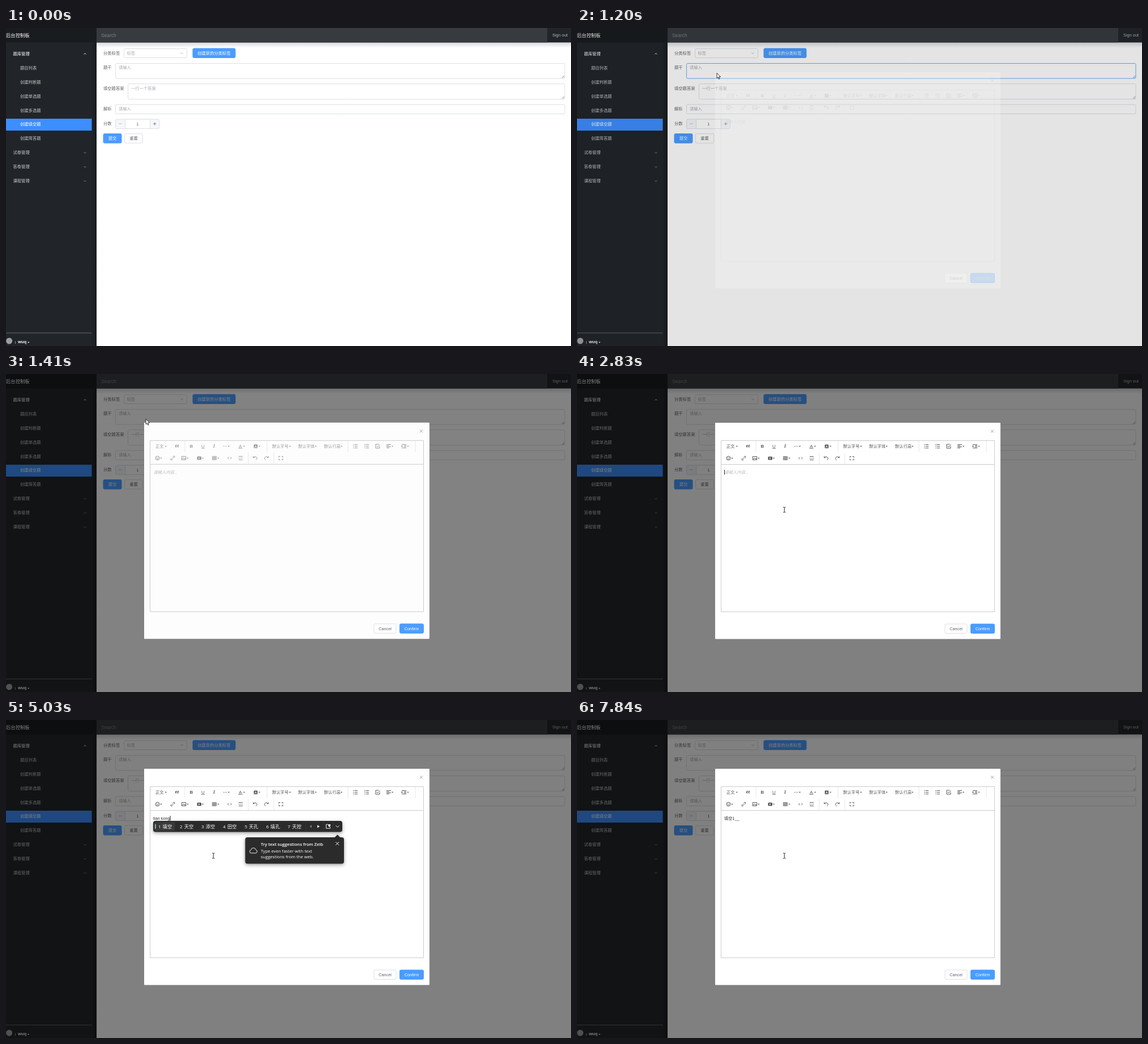
These frames come from a looping animation (998 px wide and 561 px high, 8000 ms). An HTML page with a canvas:

```html
<!DOCTYPE html>
<html lang="zh-CN">
<head>
<meta charset="utf-8">
<title>后台控制板</title>
<style>
html, body { margin: 0; width: 100%; height: 100%; overflow: hidden; background: #fff; }
canvas { display: block; }
</style>
</head>
<body>
<canvas width="998" height="561"></canvas>
<script>
const ctx = document.querySelector('canvas').getContext('2d');
const LOOP = 8000, TICK = 101, MOVE_START = 290;
const UI = '"Liberation Sans", "Noto Sans CJK SC", "Noto Sans CJK", sans-serif';
const IME = '"Open Sans", "Noto Sans CJK SC", "Noto Sans CJK", sans-serif';
const BLUE = '#4b9cff', LABEL = '#606266', HINT = '#a8abb2', EDGE = '#dcdfe6', DARK = '#2b2b2b';

// y is the vertical centre of the text
function text(s, x, y, color, { size = 7.3, style = '', align = 'left', family = UI } = {}) {
  ctx.font = `${style} ${size}px ${family}`;
  ctx.textAlign = align;
  ctx.fillStyle = color;
  ctx.fillText(s, x, y + size * 0.37);
}
function box(x, y, w, h, fill, edge, r = 0) {
  ctx.beginPath();
  ctx.roundRect(x, y, w, h, r);
  if (fill) { ctx.fillStyle = fill; ctx.fill(); }
  if (edge) { ctx.strokeStyle = edge; ctx.lineWidth = 1; ctx.stroke(); }
}
function path(d, x, y, { stroke, fill, width = 1 }) {
  const p = new Path2D(d);
  ctx.save();
  ctx.translate(x, y);
  if (fill) { ctx.fillStyle = fill; ctx.fill(p); }
  if (stroke) { ctx.strokeStyle = stroke; ctx.lineWidth = width; ctx.stroke(p); }
  ctx.restore();
}
function shade(x, y, w, h, x2, y2, from, to) {
  const g = ctx.createLinearGradient(x, y, x2, y2);
  g.addColorStop(0, from);
  g.addColorStop(1, to);
  box(x, y, w, h, g);
}
function shadowed(blur, draw) {
  ctx.save();
  ctx.shadowColor = 'rgba(0,0,0,.4)';
  ctx.shadowBlur = blur;
  ctx.shadowOffsetY = 2;
  draw();
  ctx.restore();
}
const chevron = (x, y, color, up) =>
  path(up ? 'M-2 1L0-1L2 1' : 'M-2-1L0 1L2-1', x, y, { stroke: color, width: 0.9 });
const drop = (x, y, color) => path('M-1.7-.9H1.7L0 1.1Z', x, y, { fill: color });

function button(s, x, y, w, primary) {
  box(x, y, w, 16.5, primary ? BLUE : '#fff', primary ? BLUE : EDGE, 2);
  text(s, x + w / 2, y + 8, primary ? '#fff' : LABEL, { align: 'center' });
}
function field(label, y, x, top, h, hint, focused) {
  text(label, 172, y, LABEL);
  box(x, top, 987 - x, h, '#fff', focused ? '#6aaef5' : EDGE, 2);
  text(hint, x + 5.5, y, HINT);
  if (h > 20) path('M-4 0L0-4M-1.5 0L0-1.5', 986, top + h - 1, { stroke: '#777', width: 0.8 });
}

function sidebar() {
  box(0, 0, 160, 561, '#212529');
  shade(151.5, 25, 8.5, 536, 160, 25, '#202428', '#191c20');
  const items = ['题库管理', '题目列表', '创建判断题', '创建单选题', '创建多选题',
    '创建填空题', '创建简答题', '试卷管理', '答卷管理', '课程管理'];
  box(0, 160, 151.5, 21, '#3d8eff');
  items.forEach((s, i) => {
    const y = 45 + i * 24.95, nested = i > 0 && i < 7;
    const color = i === 0 || i === 5 ? '#fff' : '#c6c8ca';
    text(s, nested ? 25 : 12.5, y, color, { style: i === 0 ? '500' : '' });
    if (!nested) chevron(139.5, y + 0.5, i ? '#8d9094' : '#fff', i === 0);
  });
  box(0, 537.5, 151.5, 1, '#66696c');
  path('M0 5.5a5.5 5.5 0 1 0 11 0a5.5 5.5 0 1 0-11 0', 0.2, 546.5, { fill: '#9c9fa1' });
  box(16, 552.5, 0.8, 4.5, '#aaa');
  text('wuq', 21, 553.5, '#fff', { size: 7.5, style: 'bold' });
  drop(39.7, 554.7, '#fff');
}
function header() {
  shade(160, 25, 838, 10, 160, 35, 'rgba(40,50,70,.2)', 'rgba(40,50,70,0)');
  box(0, 0, 998, 25.4, '#212529');
  box(0, 0, 160, 25.4, '#191c1f');
  box(160, 0, 796, 25.4, '#373b40');
  text('后台控制板', 0, 13, '#fff', { size: 8.35, style: '500' });
  text('Search', 168, 12.5, '#7b8187', { size: 8.4 });
  text('Sign out', 965, 12.3, '#b4b7ba', { size: 7.4 });
}
function form(focused) {
  text('分类标签', 172, 44, LABEL);
  box(208.5, 36.5, 111, 16, '#fff', EDGE, 2);
  text('标签', 213.5, 44, HINT);
  chevron(310.5, 44.5, HINT);
  button('创建新的分类标签', 330, 36, 75, true);
  field('题干', 69.5, 193.5, 62.5, 26.5, '请输入', focused);
  field('填空题答案', 106, 215.5, 98.5, 27, '一行一个答案');
  field('解析', 142.5, 193.5, 135, 16.5, '请输入');
  text('分数', 172, 168.5, LABEL);
  box(193.5, 161, 77, 16.5, '#f5f7fa', EDGE, 2);
  box(210.5, 161, 44, 16.5, '#fff', EDGE);
  path('M-2.7 0H2.7', 201.7, 169, { stroke: HINT, width: 0.8 });
  text('1', 232.3, 169, LABEL, { align: 'center' });
  path('M-2.7 0H2.7M0-2.7V2.7', 262.7, 169, { stroke: LABEL, width: 0.8 });
  button('提交', 172, 186.5, 32, true);
  button('重置', 209.5, 186.5, 32);
}

const ICONS = [
  [302.5, 127.5, 'M-1-2.3Q-3-1.5-2.8 1M2.5-2.3Q.5-1.5.7 1M-2.8 1.3h1.4M.7 1.3h1.4', 1.6],
  [387, 127.5, 'M-3.2 0h1.2M-.6 0h1.2M2 0h1.2'],
  [617, 127.5, 'M-1.5-3H4M-1.5 0H4M-1.5 3H4M-4-3h1.4M-4 0h1.4M-4 3h1.4'],
  [637, 127.5, 'M-1.2-3H4M-1.2 0H4M-1.2 3H4M-3-4v2.2M-3.7 0h1.4M-3.7 3h1.4'],
  [656.5, 127.5, 'M3.5 0V3.5H-3.5V-3.5H2M-2-.5L0 1.5L4-3'],
  [676, 127.5, 'M-4-3H4M-4-1H1M-4 1H4M-4 3H1'],
  [703, 127.5, 'M-4-3H4M0-1H4M0 1H4M-4 3H4M-4-1.3L-2.3 0L-4 1.3Z'],
  [267.5, 148.5, 'M-3.5 0a3.5 3.5 0 1 0 7 0a3.5 3.5 0 1 0-7 0M-1.8.7q1.8 2 3.6 0M-1.3-1.5v1M1.3-1.5v1'],
  [294.5, 148.5, 'M-1 1L1-1M0-2L1.5-3.4Q4-4 3.4-1.5L2 0M0 2L-1.5 3.4Q-4 4-3.4 1.5L-2 0'],
  [314, 148.5, 'M-3.7-3H3.7V3H-3.7ZM-3 2L-1-.5L1 1.5L2 .3L3.3 2'],
  [368, 148.5, 'M-3.5-3H3.5V3H-3.5ZM-3.5-1H3.5M-3.5 1H3.5M-1.2-3V3M1.2-3V3', 0.8],
  [395, 148.5, 'M-1.5-1.8L-3.3 0L-1.5 1.8M1.5-1.8L3.3 0L1.5 1.8'],
  [414.5, 148.5, 'M-3.5-3H3.5M-3.5 3H3.5M-3.5 0h1.6M-.8 0h1.6M1.9 0h1.6'],
  [440, 148.5, 'M-3.3-3.2V-.8H-1M-3.3-.8Q-1-3.8 2-2Q5 .8 1.4 3.5'],
  [460, 148.5, 'M3.3-3.2V-.8H1M3.3-.8Q1-3.8-2-2Q-5 .8-1.4 3.5'],
  [485.5, 148.5, 'M-3.5-1V-3H-1.2M1.2-3H3.5V-1M3.5 1V3H1.2M-1.2 3H-3.5V1'],
];
function toolbar(ink) {
  for (const [x, y, d, width] of ICONS) path(d, x, y, { stroke: ink, width });
  text('正文', 264, 127.3, ink);
  ['默认字号', '默认字体', '默认行高'].forEach((s, i) => text(s, 470 + i * 45.9, 127.3, ink));
  const mid = { size: 8, align: 'center' };
  text('B', 327.5, 127.5, ink, { ...mid, style: 'bold' });
  text('U', 348, 127, ink, mid);
  box(345, 130.8, 6, 0.9, ink);
  text('I', 367.5, 127.5, ink, { ...mid, style: 'italic bold', family: '"Liberation Serif", serif' });
  text('A', 414, 126.8, ink, mid);
  box(410.5, 130.6, 7, 1, ink);
  box(437.7, 124.5, 6.6, 6.5, ink, null, 1);
  text('A', 441, 127.8, '#fff', { size: 5.5, style: 'bold', align: 'center' });
  box(337.5, 145.7, 7.5, 5.8, ink, null, 1.2);
  path('M-1-1.4L1.6 0L-1 1.4Z', 341, 148.6, { fill: '#fff' });
  for (const x of [282.3, 393.5, 420.5, 447.7, 501.7, 547, 592.7, 682.7, 710]) drop(x, 127.7, ink);
  for (const x of [274, 321, 347.5, 375]) drop(x, 148.7, ink);
  for (const x of [316, 461, 604, 723]) box(x - 0.5, 118, 1, 20, '#e8e8e8');
  for (const x of [428, 473]) box(x - 0.5, 139, 1, 20, '#e8e8e8');
}
function dialog(shown, enabled, placeholder) {
  ctx.save();
  ctx.globalAlpha = shown;
  ctx.translate(0, -10.4 * (1 - shown));
  box(244, 86, 504, 381.5, '#fff', null, 1);
  path('M-2.5-2.5L2.5 2.5M2.5-2.5L-2.5 2.5', 733.5, 101, { stroke: '#909399', width: 0.9 });
  box(254.5, 117.5, 483, 302, null, '#ccc');
  box(254.5, 159, 483, 1, '#ccc');
  toolbar(enabled ? '#595959' : '#999');
  if (placeholder) text('请输入内容...', 260.5, 173, '#bbb', { style: 'italic' });
  button('Cancel', 650, 441, 39);
  button('Confirm', 695.5, 441, 42, true);
  ctx.restore();
}

// [time, text, caret visible, candidates]
const TYPING = [
  [0, '', false], [1720, '', true], [2230, '', false], [2830, '', true], [3330, '', false],
  [3830, 't', true, '他 她 它 太 图 天 贴'],
  [4130, 'tian', true, '天 田 甜 填 添 舔 佃'],
  [4430, 'tian k', true, '天空 填空 天坑 田 天 甜 填'],
  [4830, 'tian ko', true, '天空 填空 天口 天 田 填 甜'],
  [5030, 'tian kong', true, '填空 天空 添空 田空 天孔 填孔 天控'],
  [5540, '填空', true], [6040, '填空', false], [6240, '填空1', true], [6740, '填空1', false],
  [6840, '填空1_', true], [6940, '填空1__', true], [7340, '填空1__\n', true], [7840, '填空1__\n', false],
];
function typed([, value, caret]) {
  const newline = value.endsWith('\n');
  text(value.trim(), 260, 173, '#333');
  const end = newline ? 0 : ctx.measureText(value).width;
  if (caret) box(260 + end, newline ? 187 : 169, 0.9, 8.5, '#000');
}
function candidates(words) {
  const white = { stroke: '#fff', width: 0.9 };
  shadowed(6, () => box(260, 178, 334, 19.5, DARK, null, 4));
  box(262, 180, 36.5, 15.5, '#3a3a3a', null, 2);
  box(263, 183.5, 1.6, 8.5, '#8fd0c0', null, 0.8);
  words.split(' ').forEach((word, i) => {
    const x = 269 + i * 38.1;
    text(i + 1, x, 187.7, '#fff', { size: 8, family: IME });
    text(word, x + 7.6, 187.5, '#fff', { size: 8.3, family: IME });
  });
  for (const x of [529, 561, 577.5]) box(x, 178, 0.7, 19.5, '#383838');
  path('M2-2.5V2.5L-2 0Z', 538, 187.7, { fill: '#777' });
  path('M-2-2.5V2.5L2 0Z', 552, 187.7, { fill: '#fff' });
  path('M0-3.5H-3.5V3.5H3.5V1', 569, 187.7, white);
  path('M.3-3.8H4V-.6L2.2 1L.3-.6Z', 569, 187.7, { fill: '#fff' });
  path('M-3-1.5L0 1.5L3-1.5', 585.5, 187.7, white);

  shadowed(6, () => {
    box(422.5, 207, 174.5, 46.5, DARK, null, 4);
    path('M-5 0L0-5L5 0Z', 585.5, 207.3, { fill: DARK });
  });
  path('M-4 4.3a2.9 2.9 0 0 1-.3-5.7a4.4 4.4 0 0 1 8.6 0a2.9 2.9 0 0 1-.3 5.7Z', 437, 230.5, white);
  path('M-3-3L3 3M3-3L-3 3', 585.3, 218, white);
  const tip = { size: 7.6, family: IME };
  text('Try text suggestions from Zelb', 450, 219.5, '#fff', { ...tip, style: '600' });
  text('Type even faster with text', 450, 231, '#fff', tip);
  text('suggestions from the web.', 450, 241.5, '#fff', tip);
}

const clamp = v => Math.min(1, Math.max(0, v));
const mix = (a, b, p) => a + (b - a) * p;
const smooth = p => p * p * (3 - 2 * p);
// CSS "ease" timing curve, solved by bisection
function ease(x) {
  let lo = 0, hi = 1, s;
  for (let i = 0; i < 20; i++) {
    s = (lo + hi) / 2;
    if (0.75 * s * (1 - s) ** 2 + 0.75 * s * s * (1 - s) + s ** 3 < x) lo = s; else hi = s;
  }
  return 0.3 * s * (1 - s) ** 2 + 3 * s * s * (1 - s) + s ** 3;
}

function pointer(step) {
  if (step < 0) return;
  let x, y, beam;
  if (step < 8) {
    const p = smooth(clamp(step / 6));
    x = mix(828, 248.5, p);
    y = step < 7 ? mix(464, 69, p) : 79;
    beam = y < 90;
  } else {
    const p = smooth(clamp((step - 11) / 4));
    x = mix(247, 366.3, p);
    y = mix(79.5, 239.5, p);
    beam = y > 160 || step === 8;
  }
  if (beam) path('M-2.2-4.5H-.6L0-4L.6-4.5H2.2M0-4V4M-2.2 4.5H-.6L0 4L.6 4.5H2.2', x, y, { stroke: '#111', width: 0.9 });
  else path('M0 0V9.2L2.1 7.2L3.6 10.6L5.2 9.9L3.7 6.6H6.6Z', x, y, { fill: '#fff', stroke: '#000', width: 0.8 });
}

function draw(t) {
  const step = Math.floor((t - MOVE_START) / TICK);
  const shown = ease(clamp((MOVE_START + step * TICK - 1150) / 300));
  const state = TYPING.findLast(([time]) => t >= time);
  box(0, 0, 998, 561, '#fff');
  sidebar();
  header();
  form(step === 8 || step === 9);
  if (step > 8) {
    box(0, 0, 998, 561, `rgba(0,0,0,${shown / 2})`);
    dialog(shown, t >= 1920, !state[1]);
    typed(state);
    if (state[3]) candidates(state[3]);
  }
  pointer(step);
}
function tick() {
  draw(performance.now() % LOOP);
  requestAnimationFrame(tick);
}
tick();
</script>
</body>
</html>
```
